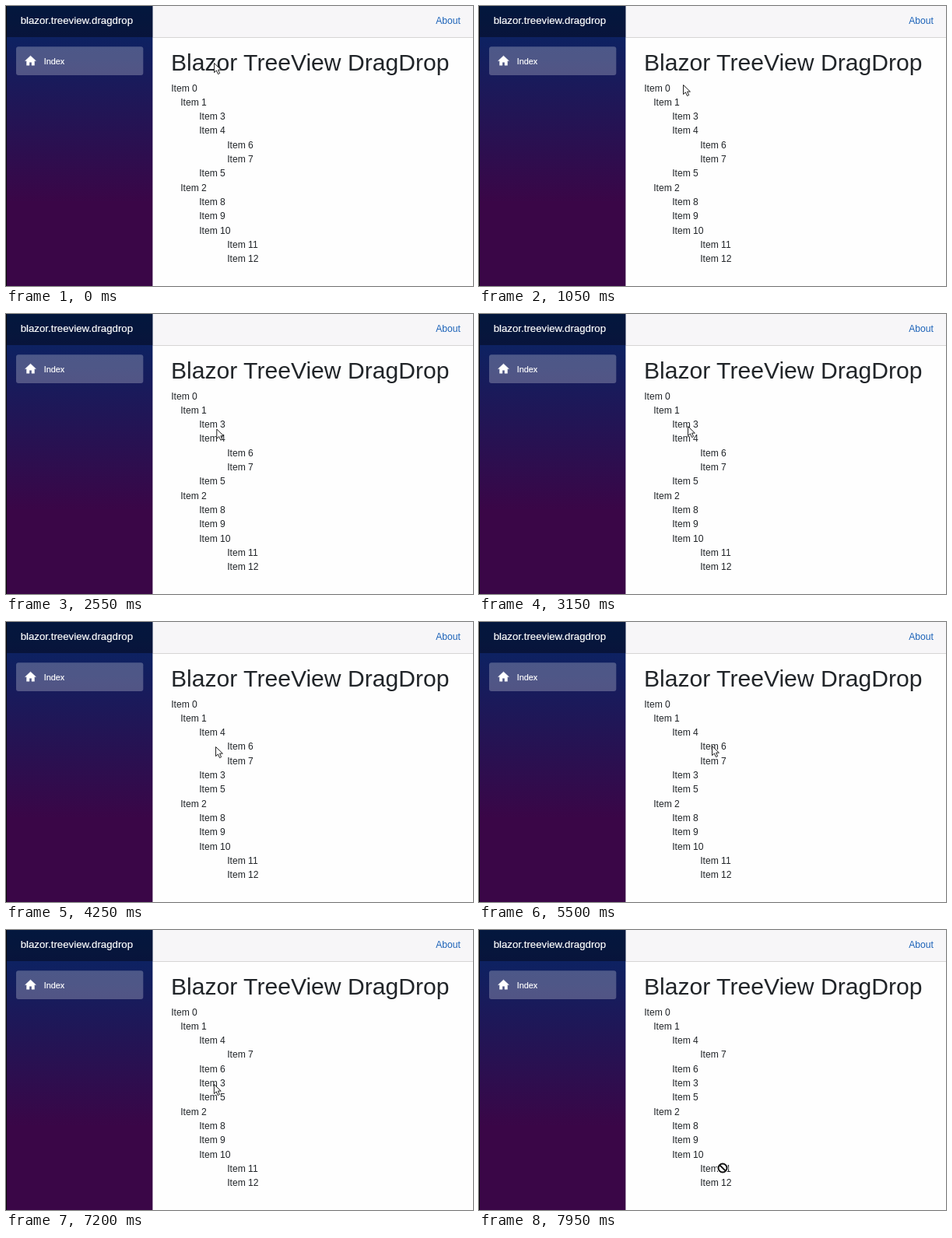
An HTML page that plays this animation: 600 px wide and 360 px high, repeating every 8000 ms.

```html
<!DOCTYPE html>
<html lang="en">
<head>
<meta charset="utf-8">
<title>Blazor TreeView DragDrop</title>
<style>
  html, body { margin: 0; width: 100%; height: 100%; overflow: hidden; background: #fefefe; }
  svg { display: block; font-family: "Liberation Sans", Arial, sans-serif; }
  #tree { font-size: 12.1px; fill: #212529; }
  #nav { fill: #fff; stroke: #fff; stroke-width: .2; }
</style>
</head>
<body>
<svg width="600" height="360" viewBox="0 0 600 360">
  <defs>
    <linearGradient id="side" x1="0" y1="0" x2="0" y2="1">
      <stop offset="0" stop-color="#052767"/>
      <stop offset=".7" stop-color="#3a0647"/>
    </linearGradient>
  </defs>
  <rect x="188" width="412" height="40" fill="#f7f6f8"/>
  <rect x="188" y="40" width="412" height="1" fill="#d6d5d5"/>
  <rect width="188.4" height="360" fill="url(#side)"/>
  <rect width="188.4" height="40" fill="#000" fill-opacity=".4"/>
  <rect width="1" height="360" fill="#080808"/>
  <rect x="13" y="52.3" width="163.3" height="36.7" rx="3" fill="#fff" fill-opacity=".25"/>
  <path d="M31.5 64 24.5 70.6H26.5V76.3H30V72.3H33V76.3H36.5V70.6H38.5Z" fill="#fff" stroke="#fff" stroke-width=".4" stroke-linejoin="round"/>
  <g id="nav">
    <text x="18.7" y="23.3" font-size="13.25">blazor.treeview.dragdrop</text>
    <text x="48.7" y="74.6" font-size="10.8">Index</text>
  </g>
  <text x="552.3" y="22.5" font-size="12.1" fill="#1b62b8">About</text>
  <text x="212" y="83" font-size="30.1" fill="#212529">Blazor TreeView DragDrop</text>
  <g id="tree"></g>
  <path id="arrow" d="M.5.5V12.6L3.4 9.9 5.5 14.6 7.6 13.6 5.6 9.1H9.4Z" fill="#fff" stroke="#222" stroke-linejoin="round"/>
  <g id="block" fill="none">
    <circle r="5.5" fill="#fff" stroke="#fff" stroke-width="4"/>
    <path d="M-5.5 0A5.5 5.5 0 1 1 5.5 0A5.5 5.5 0 1 1 -5.5 0M-3.9-3.9 3.9 3.9" stroke="#111" stroke-width="2"/>
  </g>
</svg>
<script>
const LOOP = 8000, TRAVEL = 650, DRAG_START = 7850;
const ROW = 18.33, TOP = 109.5, LEFT = 212.2, STEP = 12;

// Pointer stops: arrival time, x, y
const stops = [
  [0, 267, 73], [750, 262, 101], [1700, 275, 155], [2800, 268, 144],
  [3850, 269, 160], [5200, 299, 159], [6250, 266, 196], [7800, 313, 306]
];

const $ = id => document.getElementById(id);
const node = (id, ...kids) => ({ id, kids });

const item3 = node(3), item5 = node(5), item6 = node(6), item7 = node(7);
const item4 = node(4, item6, item7);
const item1 = node(1, item3, item4, item5);
const item2 = node(2, node(8), node(9), node(10, node(11), node(12)));
const root = node(0, item1, item2);

// Each drop gives a node its new children
const drops = [
  { at: 0, parent: item1, kids: [item3, item4, item5] },
  { at: 0, parent: item4, kids: [item6, item7] },
  { at: 4000, parent: item1, kids: [item4, item3, item5] },
  { at: 6350, parent: item4, kids: [item7] },
  { at: 6350, parent: item1, kids: [item4, item6, item3, item5] }
];

const flatten = n => [n, ...n.kids.flatMap(flatten)];
const rows = flatten(root).map(({ id }) => {
  const text = document.createElementNS("http://www.w3.org/2000/svg", "text");
  text.textContent = "Item " + id;
  return $("tree").appendChild(text);
});

// Every level is indented by one step more than the last
function place(n, depth = 0, x = LEFT, line = 0) {
  const row = rows[n.id];
  row.textContent = "Item " + n.id;
  row.setAttribute("x", x);
  row.setAttribute("y", TOP + line++ * ROW);
  for (const kid of n.kids) line = place(kid, depth + 1, x + STEP * (depth + 1), line);
  return line;
}

let applied;
function layout(t) {
  const due = drops.filter(d => d.at <= t);
  if (due.length === applied) return;
  applied = due.length;
  for (const { parent, kids } of due) parent.kids = kids;
  place(root);
}

function pointer(t) {
  const next = stops.findIndex(s => s[0] > t);
  if (next < 0) return stops.at(-1).slice(1);
  const [, x0, y0] = stops[next - 1], [arrive, x1, y1] = stops[next];
  const u = Math.max(0, 1 - (arrive - t) / TRAVEL), k = u * u * (3 - 2 * u);
  return [x0 + (x1 - x0) * k, y0 + (y1 - y0) * k];
}

function draw(t) {
  layout(t);
  const [x, y] = pointer(t), blocked = t >= DRAG_START;
  for (const id of ["arrow", "block"]) {
    $(id).setAttribute("transform", `translate(${x} ${y})`);
    $(id).style.display = (id === "block") === blocked ? "" : "none";
  }
}

const start = performance.now();
function tick() {
  draw((performance.now() - start) % LOOP);
  requestAnimationFrame(tick);
}
tick();
</script>
</body>
</html>
```
